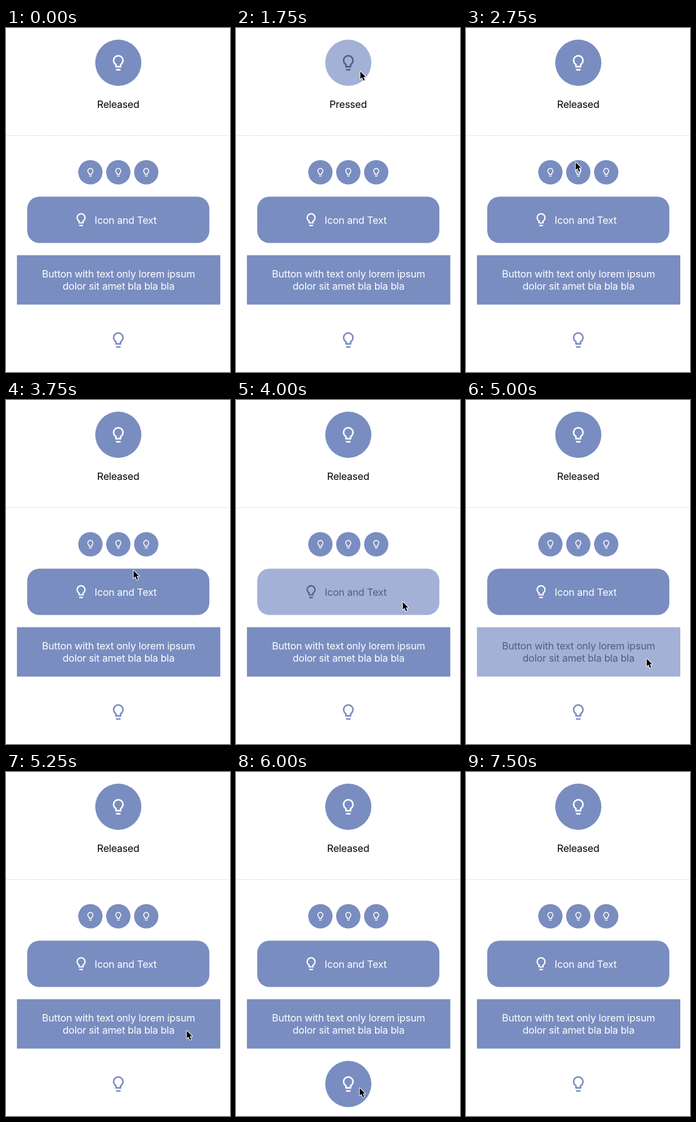
Write an HTML page that moves like this. It is 369 by 564 pixels and loops after 7.75 s.

```html
<!DOCTYPE html>
<html lang="en">
<head>
<meta charset="utf-8">
<title>Button states</title>
<style>
  html, body { margin: 0; width: 100%; height: 100%; overflow: hidden; background: #fff; }
  svg { display: block; width: 369px; height: 564px; }
  text { font: 16.4px Inter, "Open Sans", sans-serif; letter-spacing: -.18px; }
  .mid { text-anchor: middle; }
  .btn { --bg: #7a8dc0; --fg: #fff; }
  .btn.down { --bg: #a3b1d7; --fg: #525d83; }
  .clear { --bg: none; --fg: #7a8dc0; }
  .clear.down { --bg: #7a8dc0; --fg: #fff; }
  .bg { fill: var(--bg); }
  .fg { fill: var(--fg); }
</style>
</head>
<body>
<svg viewBox="0 0 369 564">
  <defs>
    <path id="bulb" transform="translate(-12 -12)" d="M9 21c0 .55.45 1 1 1h4c.55 0 1-.45 1-1v-1H9zM12 2C8.14 2 5 5.14 5 9c0 2.38 1.19 4.47 3 5.74V17c0 .55.45 1 1 1h6c.55 0 1-.45 1-1v-2.26c1.81-1.27 3-3.36 3-5.74 0-3.86-3.14-7-7-7zm2.85 11.1l-.85.6V16h-4v-2.3l-.85-.6C7.8 12.16 7 10.63 7 9c0-2.76 2.24-5 5-5s5 2.24 5 5c0 1.63-.8 3.16-2.15 4.1z"/>
  </defs>

  <g class="btn" id="round">
    <circle class="bg" cx="185" cy="57" r="38"/>
    <use class="fg" href="#bulb" transform="translate(185 57) scale(1.28)"/>
  </g>
  <text class="mid" id="label" x="184.8" y="131">Released</text>
  <path d="M0 176.5H369" stroke="#dcdcdc" stroke-dasharray="2 1"/>

  <g class="btn" id="minis"></g>

  <g class="btn" id="wide">
    <rect class="bg" x="35" y="276.5" width="300" height="76" rx="20"/>
    <use class="fg" href="#bulb" transform="translate(123.7 314.2) scale(1.07)"/>
    <text class="fg" x="146" y="320.5">Icon and Text</text>
  </g>

  <g class="btn" id="block">
    <rect class="bg" x="18" y="372.5" width="335" height="81"/>
    <text class="fg mid" x="185.3" y="409">Button with text only lorem ipsum</text>
    <text class="fg mid" x="185.3" y="429">dolor sit amet bla bla bla</text>
  </g>

  <g class="clear" id="ghost">
    <circle class="bg" cx="185" cy="511.5" r="38"/>
    <use class="fg" href="#bulb" transform="translate(185 511.5) scale(1.28)"/>
  </g>

  <path id="cursor" d="M1.8 2.2V14.6L4.7 11.9 7 17.2 9 16.3 6.8 11.2H10.7z"
    stroke="#fff" stroke-width="2" stroke-linejoin="round" paint-order="stroke"/>
</svg>
<script>
const $ = id => document.getElementById(id);
const LOOP = 7750, STEP = 250, MOVE = 2 * STEP;
const SHOW = 500, HIDE = 7250, JUMP = 9;

$('minis').innerHTML = [139, 185, 231].map(x =>
  `<circle class="bg" cx="${x}" cy="236.5" r="20"/>
   <use class="fg" href="#bulb" transform="translate(${x} 236.5) scale(.7)"/>`).join('');

// Pointer key points: arrival, x, y, easing power (below 1 eases out)
const path = [
  [1000, 197, 68, .3], [1750, 203, 69, JUMP], [2250, 250, 79, .1],
  [2750, 179, 218, JUMP], [3000, 133, 247, JUMP], [3500, 169, 246, 1],
  [4000, 273, 329, 1.4], [4750, 296, 422, JUMP], [5750, 202, 516, .18]
];

const presses = {
  round: [1000, 2250], wide: [4000, 4500], block: [5000, 5250], ghost: [6000, 6500]
};

function pointer(t) {
  let px = 251, py = 40;
  for (const [end, x, y, power] of path) {
    const u = Math.min(1, Math.max(0, (t - end) / MOVE + 1)) ** power;
    px += (x - px) * u;
    py += (y - py) * u;
  }
  return `translate(${px} ${py})`;
}

function draw(t) {
  for (const [id, [from, to]] of Object.entries(presses))
    $(id).classList.toggle('down', t >= from && t < to);
  $('label').textContent = $('round').classList.contains('down') ? 'Pressed' : 'Released';
  $('cursor').style.display = t >= SHOW && t < HIDE ? '' : 'none';
  $('cursor').setAttribute('transform', pointer(t));
}

const start = performance.now();
function tick() {
  const t = (performance.now() - start) % LOOP;
  draw(t - t % STEP); // the picture advances in whole steps
  requestAnimationFrame(tick);
}
tick();
</script>
</body>
</html>
```
